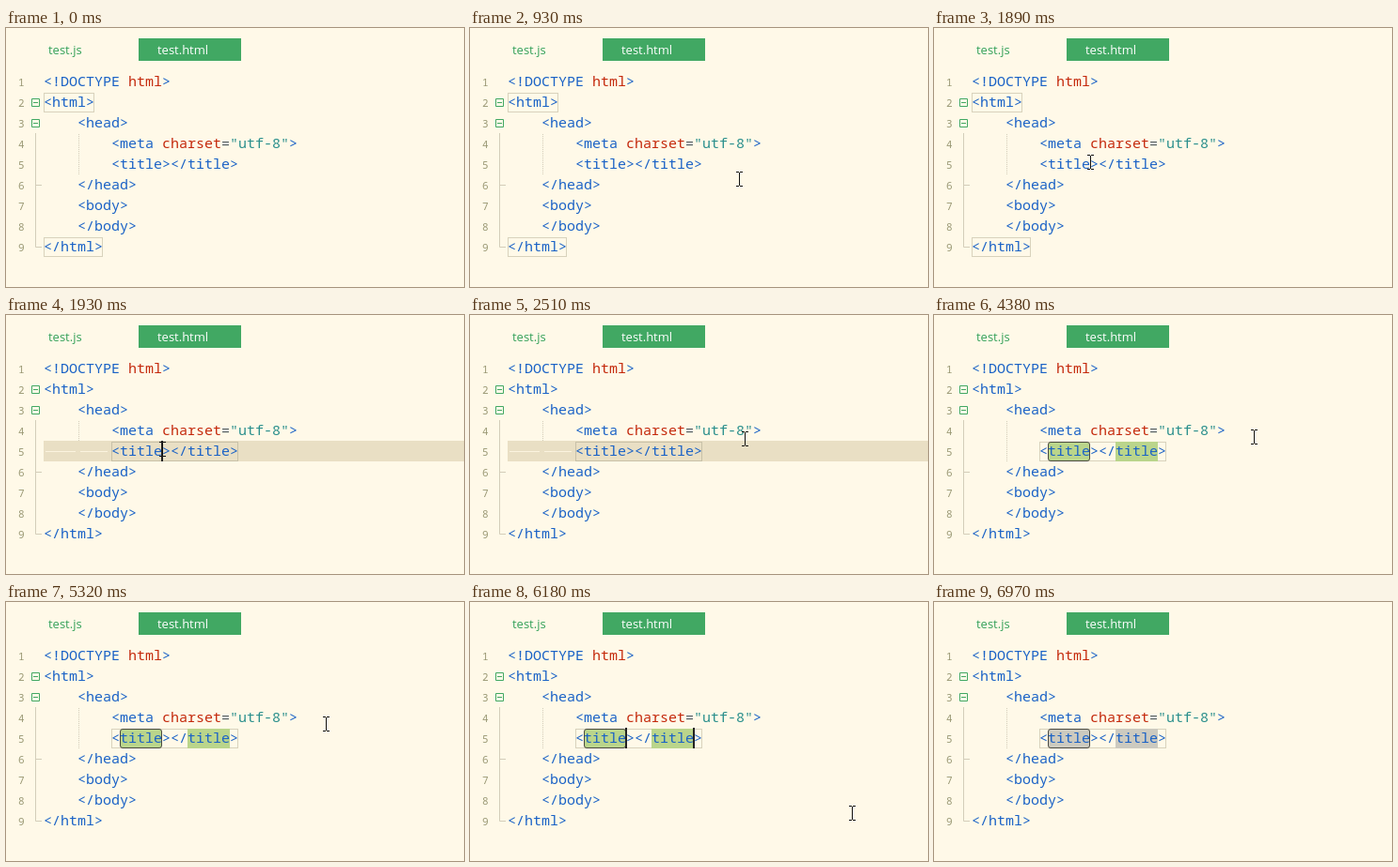
Recreate the animation shown at these times as an HTML page. Size 487 by 276 pixels, loop 7.06 s.

```html
<!DOCTYPE html>
<html lang="en">
<head>
<meta charset="utf-8">
<title>Editor</title>
<style>
  html, body { margin: 0; width: 100%; height: 100%; overflow: hidden; background: #fff9e8; }
  svg { display: block; width: 487px; height: 276px; }
  text { white-space: pre; font-variant-ligatures: none; }
  .code { font: 15px "Noto Sans Mono", monospace; fill: #1a62c6; }
  .num { font: 11px "Noto Sans Mono", monospace; fill: #9a9874; }
  .tab { font: 13px "Open Sans", sans-serif; }
  .attr { fill: #c4290c; }
  .str { fill: #2a8f8c; }
  .op { fill: #4f5a60; }
  .box { fill: none; stroke: #d8d2bc; }
  .fold { fill: none; stroke: #d3cdb9; }
  .sign { fill: none; stroke: #41a863; }
</style>
</head>
<body>
<svg viewBox="0 0 487 276">
  <rect width="487" height="276" fill="#fff9e8"/>
  <rect x="141" y="11" width="109" height="24" fill="#41a863"/>
  <text class="tab" x="45" y="28" fill="#34a159">test.js</text>
  <text class="tab" x="161" y="28" fill="#fff">test.html</text>

  <g id="row">
    <rect x="40" y="134" width="447" height="22" fill="#e9dfc4"/>
    <path d="M42 145.5H74M79 145.5H108" stroke="#fbf3df" fill="none"/>
  </g>
  <path id="guide" stroke="#d3cdb9" stroke-dasharray="1 1" stroke-dashoffset="1" fill="none"/>
  <g id="rootBoxes" class="box">
    <rect x="40.5" y="69.5" width="53" height="20"/>
    <rect x="40.5" y="223.5" width="62" height="20"/>
  </g>
  <rect id="titleBox" class="box" x="112.5" y="135.5" width="134" height="20"/>
  <g id="marks">
    <rect x="121.5" y="135.5" width="44" height="20" rx="2.5" stroke="#4a4a42"/>
    <rect x="193" y="135" width="45" height="21"/>
  </g>

  <path class="fold" d="M31.5 112V233.5H38M31.5 167.5H38"/>
  <path class="sign" d="M27.5 75.5h8v8h-8zM29 79.5h5M27.5 97.5h8v8h-8zM29 101.5h5"/>
  <g id="lines"></g>
  <g fill="#222">
    <rect id="caretA" x="165" y="134" width="2" height="22"/>
    <rect id="caretB" x="237" y="134" width="2" height="22"/>
  </g>
  <path id="pointer" d="M-3 -7.5H0M1 -7.5H4M.5 -7V7M-3 7.5H0M1 7.5H4" fill="none" stroke="#111"/>
</svg>
<script>
const LOOP = 7060, CLICK = 1930, SELECT = 4380, BLUR = 6970;
const ENTER = 400, LEAVE = 6300, STEP = 60, BLINK = 490;
const $ = id => document.getElementById(id);
const show = (id, on) => $(id).setAttribute("visibility", on ? "visible" : "hidden");

// indent level, then pieces of text with an optional class
const code = [
  [0, ["<!DOCTYPE "], ["html", "attr"], [">"]],
  [0, ["<html>"]],
  [1, ["<head>"]],
  [2, ["<meta "], ["charset", "attr"], ["=", "op"], ['"utf-8"', "str"], [">"]],
  [2, ["<title></title>"]],
  [1, ["</head>"]],
  [1, ["<body>"]],
  [1, ["</body>"]],
  [0, ["</html>"]]
];

function add(tag, attrs, text, parent) {
  const el = document.createElementNS("http://www.w3.org/2000/svg", tag);
  for (const k in attrs) el.setAttribute(k, attrs[k]);
  el.textContent = text;
  return parent.appendChild(el);
}

code.forEach(([indent, ...parts], i) => {
  const y = 62 + 22 * i;
  add("text", { class: "num", x: 13, y }, i + 1, $("lines"));
  const line = add("text", { class: "code", x: 40 + 36 * indent, y }, "", $("lines"));
  for (const [text, cls = ""] of parts) add("tspan", { class: cls }, text, line);
});

// x eases in and y eases out, by the given powers
const moves = [
  { from: 390, to: 1050, x: 268, y: 161, easeX: 2.7, easeY: 4 },
  { from: 1050, to: 1410, x: 173, y: 144 },
  { from: 1590, to: 1890, x: 166, y: 143 },
  { from: 2090, to: 2630, x: 340, y: 130, easeX: 1.3, easeY: 1.25 },
  { from: 5840, to: 6260, x: 433, y: 263 }
];

function pointerAt(t) {
  let x = 311, y = 266;
  for (const m of moves) {
    const elapsed = Math.floor((t - m.from) / STEP) * STEP;
    const p = Math.max(0, Math.min(1, elapsed / (m.to - m.from)));
    x += (m.x - x) * p ** (m.easeX || 1);
    y += (m.y - y) * (1 - (1 - p) ** (m.easeY || 1));
  }
  return [Math.round(x), Math.round(y)];
}

function draw(t) {
  const clicked = t >= CLICK, selected = t >= SELECT, focused = t < BLUR;
  const lit = clicked && !selected;
  const caret = clicked && focused && Math.floor((t - CLICK + STEP) / BLINK) % 2 === 0;

  show("row", lit);
  show("rootBoxes", !clicked);
  show("titleBox", clicked);
  $("titleBox").style.stroke = lit ? "#c8c1a8" : "#d8d2bc";
  $("guide").setAttribute("d", "M77.5 112V" + (lit ? 134 : 156));
  show("marks", selected);
  $("marks").setAttribute("fill", focused ? "#bad58b" : "#cccabf");
  show("caretA", caret);
  show("caretB", caret && selected);
  show("pointer", t >= ENTER && t < LEAVE);
  $("pointer").setAttribute("transform", `translate(${pointerAt(t)})`);
}

const start = performance.now();
function tick() {
  draw((performance.now() - start) % LOOP);
  requestAnimationFrame(tick);
}
tick();
</script>
</body>
</html>
```
